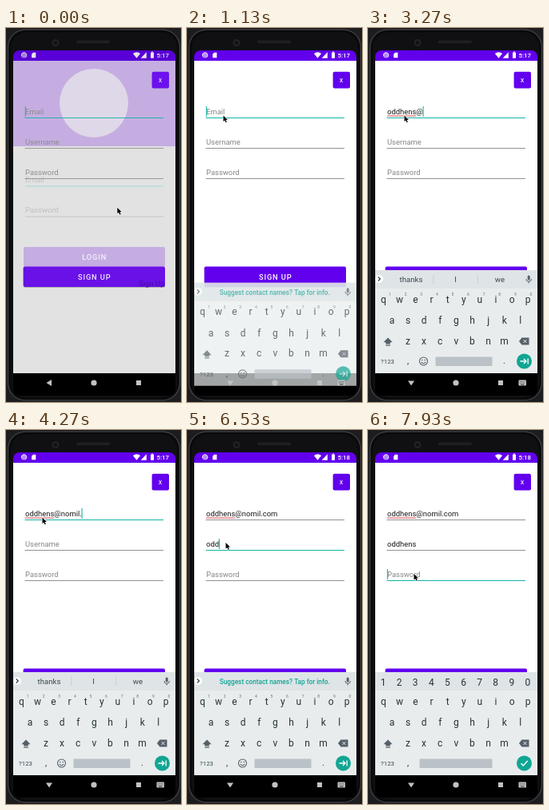
An HTML page with a canvas for the animation above (8000 ms loop, 219 by 468 pixels).

```html
<!DOCTYPE html>
<html lang="en">
<head>
<meta charset="utf-8">
<title>Sign up form</title>
<style>
html, body { margin: 0; width: 100%; height: 100%; overflow: hidden; background: #1d1d1f; }
canvas { display: block; width: 219px; height: 468px; }
</style>
</head>
<body>
<canvas id="stage"></canvas>
<script>
const LOOP = 8000;
const PURPLE = '#6200ee', LILAC = '#8940de', TEAL = '#12b5a6', INK = '#263238', GREY = '#566068';
const canvas = document.getElementById('stage');
const c = canvas.getContext('2d');
const dpr = window.devicePixelRatio || 1;
canvas.width = 219 * dpr;
canvas.height = 468 * dpr;

const EMAIL = 'oddhens@nomil.com', USER = 'oddhens';
const emailKeys = [1800, 1930, 2070, 2130, 2270, 2470, 2530, 3000, 3470, 3600, 3730, 3930, 4070, 4270, 4470, 4530, 4670];
const userKeys = [6000, 6270, 6470, 6800, 6930, 7070, 7200];
const USER_FOCUS = 5470, PASS_FOCUS = 7670;
const HINT = 'Suggest contact names? Tap for info.';
const mousePath = [
  [0, 139.5, 225], [200, 105.5, 191], [870, 45.5, 109.5], [4900, 45.5, 109.5],
  [5400, 48.5, 141], [7270, 48.5, 141], [7670, 57.5, 180], [LOOP, 57.5, 180]
];

const clamp = v => Math.max(0, Math.min(1, v));

function rect(x, y, w, h, color, r = 0) {
  c.fillStyle = color;
  c.beginPath();
  c.roundRect(x, y, w, h, r);
  c.fill();
}

function disc(x, y, r, color) {
  c.fillStyle = color;
  c.beginPath();
  c.arc(x, y, r, 0, 7);
  c.fill();
}

function shape(d, x, y, color, line = 0) {
  c.save();
  c.translate(x, y);
  const p = new Path2D(d);
  if (line) {
    c.strokeStyle = color;
    c.lineWidth = line;
    c.stroke(p);
  } else {
    c.fillStyle = color;
    c.fill(p);
  }
  c.restore();
}

function text(s, x, y, size, color, align = 'left', weight = 400, spacing = 0) {
  c.font = `${weight} ${size}px Roboto, sans-serif`;
  c.letterSpacing = spacing + 'px';
  c.textAlign = align;
  c.fillStyle = color;
  c.fillText(s, x, y);
  c.letterSpacing = '0px';
}

const buttonLabel = (label, y) => text(label, 110.7, y + 16.4, 9.3, '#fff', 'center', 500, .85);

function drawPhone() {
  rect(0, 0, 219, 468, '#1d1d1f');
  rect(2, 1.5, 216, 465, '#434346', 22);
  rect(3.2, 2.7, 213.6, 462.6, '#0a0a0c', 21);
  rect(6, 5.5, 208, 457, '#101012', 19);
  rect(88, 15.5, 42, 3.5, '#1f1f22', 1.7);
  disc(62, 18.5, 4.5, '#222226');
  disc(62, 18.5, 2.2, '#0e1018');
}

function drawStatus(t) {
  rect(9, 28, 203, 13, PURPLE, [8, 8, 0, 0]);
  disc(22.5, 34, 3.5, '#b48cf2');
  shape('M-3 1A3.2 3.2 0 1 1 2 2.5', 22.5, 34, '#efe4ff', 1);
  shape('M-2.6 -1.2L-.8 -3.3H2.6V3.3H-2.6Z', 34.7, 34, '#fff');
  shape('M-4.6 -2Q0 -5.6 4.6 -2L0 3.7Z', 163.5, 34, '#fff');
  shape('M3.5 -3.8V3.7H-3.7Z', 172.3, 34, '#fff');
  rect(181, 30.5, 4, 7.3, '#fff', .5);
  rect(182, 29.6, 2, 1, '#fff');
  text(t < 5000 ? '5:17' : '5:18', 196.3, 37, 7.9, '#fff', 'center', 500);
}

// The login screen that fades away underneath the form
function drawLogin(fade) {
  c.save();
  c.globalAlpha = .1 * fade;
  rect(9, 28, 203, 404, '#000', [8, 8, 0, 0]);
  c.globalAlpha = .33 * fade;
  rect(9, 41, 203, 107, LILAC);
  rect(22, 274, 177, 25, LILAC, 2);
  text('Email', 24, 193, 9.5, '#808080');
  rect(24, 197.5, 173, 1, '#20c5d0');
  text('Password', 24, 231, 9.5, '#808080');
  rect(24, 235.5, 173, 1, '#888');
  c.globalAlpha = .8 * fade;
  disc(110, 94, 43, '#e5e4ea');
  buttonLabel('LOGIN', 274);
  c.restore();
}

function drawField(y, hint, value, focused, caretOn) {
  text(value || hint, 24, y + .3, 9.45, value ? '#1c1c1c' : '#868686');
  rect(23.5, y + 4, 173.5, 1, focused ? TEAL : '#929292');
  if (focused && caretOn) {
    const w = value ? c.measureText(value).width : 0;
    rect(23.8 + w, y - 10, 1.1, 13, TEAL);
  }
}

function drawForm(t, email, user) {
  const focus = t < USER_FOCUS ? 0 : t < PASS_FOCUS ? 1 : 2;
  const last = Math.max(0, ...[...emailKeys, ...userKeys, USER_FOCUS, PASS_FOCUS].filter(k => k <= t));
  const caretOn = (t - last) % 1000 < 500;
  rect(182.6, 54.8, 21.4, 20.6, PURPLE, 2);
  text('X', 193.2, 67.6, 6.6, '#fff', 'center', 500);
  drawField(108, 'Email', email, focus === 0, caretOn);
  drawField(146, 'Username', user, focus === 1, caretOn);
  drawField(184, 'Password', '', focus === 2, caretOn);
  if (email.length > 7) rect(24, 109.6, c.measureText(USER).width, 1, '#e0494f');
  rect(22, 299.5, 177, 25.5, 'rgba(0,0,0,.25)', 2.5);
  rect(21.6, 298.6, 177.4, 25.4, PURPLE, 2);
  buttonLabel('SIGN UP', 299);
}

function drawSuggestions(t, email) {
  disc(14, 314, 5, '#fff');
  shape('M-1.3 -2.5L1.3 0L-1.3 2.5', 14, 314, INK, 1.1);
  rect(199.7, 309.5, 3, 6, GREY, 1.5);
  shape('M-3.3 0A3.3 3.3 0 0 0 3.3 0M0 3.3V5.5', 201.2, 314, GREY, 1);
  if (!email || t >= USER_FOCUS) {
    text(HINT, 109.8, 318, 8.25, '#12a594', 'center', 500);
    return;
  }
  const words = email.length < 8 ? [email, 'odds', 'oddity'] : ['thanks', 'I', 'we'];
  words.forEach((w, i) => text(w, 54 + 55.5 * i, 318.3, 9.6, '#37474f', 'center'));
  rect(81.5, 309, .8, 11, '#c3cace');
  rect(137, 309, .8, 11, '#c3cace');
}

function drawKeyboard(t, email) {
  const secret = t > 7730;
  const row = (keys, x, y) => [...keys].forEach((k, i) => text(k, x + 20.1 * i, y, 12, INK, 'center'));
  rect(9, 303, 203, 129, '#e8eced');
  rect(9, 303, 203, 23, '#dfe4e7');
  if (secret) row('1234567890', 19, 320);
  else {
    drawSuggestions(t, email);
    [...'1234567890'].forEach((k, i) => text(k, 27.5 + 19.6 * i, 335, 5, '#69747b', 'center'));
  }
  row('qwertyuiop', 19.3, 343.5);
  row('asdfghjkl', 30, 370);
  row('zxcvbnm', 50, 395.5);

  shape('M0 -5L5.6 .8H2.8V3H-2.8V.8H-5.6ZM-2.8 4H2.8V5.2H-2.8Z', 25, 392.5, GREY);
  shape('M-6.5 0L-3 -4.5H6V4.5H-3Z', 195.5, 392, GREY);
  shape('M-1 -2L3 2M3 -2L-1 2', 195.5, 392, '#e8eced', 1);

  text('?123', 24.5, 420.3, 7.8, '#37474f', 'center');
  text(',', 50, 420, 11, INK, 'center');
  if (secret) rect(64.5, 411.5, 91, 11.5, '#bbc2c7', 1);
  else {
    rect(84.5, 411.5, 71, 11.5, '#bbc2c7', 1);
    shape('M5 0A5 5 0 1 1 -5 0A5 5 0 1 1 5 0M-2.7 1.2Q0 4.2 2.7 1.2', 69.5, 417, GREY, 1.1);
    disc(67.8, 415.6, .8, GREY);
    disc(71.2, 415.6, .8, GREY);
    text('.', 170.5, 420, 11, INK, 'center');
  }
  disc(195.5, 417, 9.5, '#12a594');
  shape(secret ? 'M-4 0L-1.2 3L4.2 -3' : 'M-5 0H2.5M-.5 -3L2.5 0L-.5 3M4.7 -3.5V3.5', 195.5, 417, '#fff', 1.3);
}

function drawNav(open) {
  const light = '#c2c2c2';
  shape(open ? 'M-4 -2.5H4L0 3.5Z' : 'M3 -4V4L-3.5 0Z', 54, 444, light);
  disc(110, 444, 3.6, light);
  rect(163, 441, 6, 6, light);
  if (open) {
    rect(188.5, 440.5, 9.5, 7, light, 1);
    for (let i = 0; i < 8; i++) rect(190 + i % 4 * 1.9, 442 + (i >> 2) * 1.7, .8, .8, '#111');
    rect(191, 445.7, 4.5, .8, '#111');
  }
}

function drawMouse(t) {
  const i = mousePath.findIndex(p => p[0] > t);
  const [t0, x0, y0] = mousePath[i - 1], [t1, x1, y1] = mousePath[i];
  const k = (t - t0) / (t1 - t0);
  const x = x0 + (x1 - x0) * k, y = y0 + (y1 - y0) * k;
  const arrow = 'M0 0V7.5L1.8 6L3 8.8L4.3 8.2L3.1 5.5H5.4Z';
  shape(arrow, x, y, '#fff', 1.2);
  shape(arrow, x, y, '#000');
}

function draw(now) {
  const t = now % LOOP;
  const typed = (s, keys) => s.slice(0, keys.filter(k => k <= t).length);
  const email = typed(EMAIL, emailKeys), user = typed(USER, userKeys);
  const fade = clamp(1 - t / 180);
  const slide = clamp((t - 1000) / 300);

  c.setTransform(dpr, 0, 0, dpr, 0, 0);
  drawPhone();
  rect(9, 41, 203, 391, t < 930 ? '#fafafa' : '#fff');
  rect(9, 432, 203, 28, '#000', [0, 0, 8, 8]);
  drawStatus(t);
  if (fade) drawLogin(fade);
  c.globalAlpha = 1 - .1 * fade;
  drawForm(t, email, user);
  c.globalAlpha = .75 * fade;
  text('Sign Up', 198.5, 323, 9.5, '#3b0a92', 'right');
  c.globalAlpha = 1;
  if (slide) {
    c.save();
    c.beginPath();
    c.rect(9, 41, 203, 419);
    c.clip();
    c.globalAlpha = clamp(slide * 1.6);
    c.translate(0, 50 * (1 - slide) ** 2);
    drawKeyboard(t, email);
    c.restore();
  }
  drawNav(slide > 0);
  drawMouse(t);
  requestAnimationFrame(draw);
}
requestAnimationFrame(draw);
</script>
</body>
</html>
```
